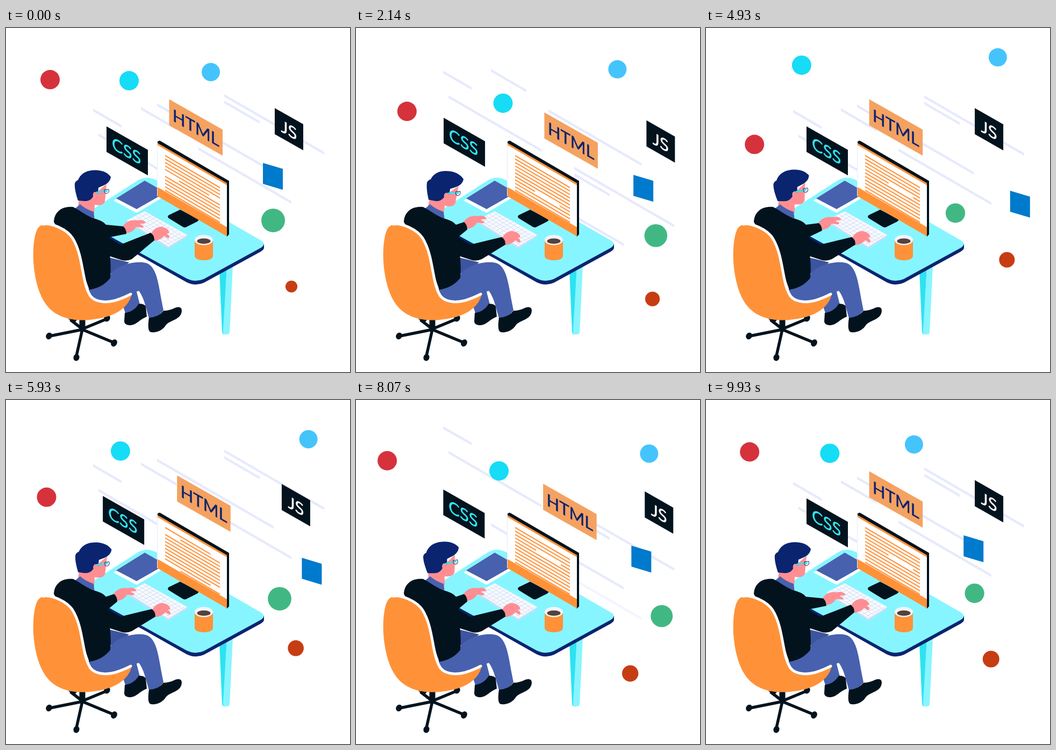
An HTML page for the animation above (10000 ms loop, 640 px wide and 640 px high).

```html
<!DOCTYPE html>
<html lang="en">
<head>
<meta charset="utf-8">
<title>Coding at the desk</title>
<style>
html, body { margin: 0; width: 100%; height: 100%; overflow: hidden; background: #fff; }
svg { display: block; width: 100vw; height: 100vh; }
text { font: 31px Lato, "Open Sans", sans-serif; stroke: currentColor; stroke-width: .5px; fill: currentColor; }
</style>
</head>
<body>
<svg viewBox="0 0 640 640">
  <defs>
    <clipPath id="keysClip"><path d="M227 357L258 341.500L335 385L302 405Z"/></clipPath>
  </defs>
  <g id="streaks" fill="#e6eafd"></g>

  <g id="css" color="#33e6f5"><path d="M0 0H77V47.500H0Z" fill="#03131d"/><text x="10" y="35.500">CSS</text></g>
  <g id="html" color="#0a2470"><path d="M0 0H99.500V48.500H0Z" fill="#f4a261"/><text x="6.500" y="36">HTML</text></g>
  <g id="js" color="#fff"><path d="M0 0H53V48.500H0Z" fill="#03131d"/><text x="11.500" y="37">JS</text></g>

  <!-- desk -->
  <path d="M397 452L411 444L404.500 570Q402 569 402 565Z" fill="#2de3f1"/>
  <path d="M411 444L422 442L416 567Q415 571 403.500 570Z" fill="#87f5ff"/>
  <path d="M480 402V409Q480 412 474 416L368 474Q352 481 336 473L140 362V350Z" fill="#0a2470"/>
  <path d="M140 351L246 283Q262 274 279 283L474 395Q485 402 474 409L368 467Q352 474 336 466L140 358Z" fill="#87f5ff"/>

  <!-- book -->
  <path d="M200 321L257 285L290 300V316L243 344Z" fill="#fff"/>
  <path d="M205 317L258 284L292 303V309L243 337Z" fill="#4761ae"/>

  <!-- monitor -->
  <path d="M303 348L324 338L357 355Q360 357 356 360L336 370Q333 372 329 370L303 354Q299 351 303 348Z" fill="#03131d"/>
  <path d="M282 212L286 210L415 285V384L411 388Z" fill="#03131d"/>
  <path d="M282 212.500L411 287.500V387.500L282 313Z" fill="#ff9239"/>
  <path d="M282 218L411 292.500V370.500L282 296Z" fill="#fff"/>
  <path d="M281.500 213V313" stroke="#e6eafd"/>
  <path d="M282 211L286 209.500L415 284.500L411 288.500L282 214Z" fill="#03131d"/>
  <g id="code" transform="matrix(1 .585 0 1 296 235.300)" stroke="#ff9239" stroke-width="2.400"></g>

  <!-- keyboard -->
  <path d="M225 358L258 341L337 385V388L302 410L225 361Z" fill="#d3dcf2"/>
  <path d="M225 357.500L258 341L337 385L302 406.500Z" fill="#f7faff"/>
  <g id="keys" clip-path="url(#keysClip)" stroke="#cfdaf0" stroke-width=".9"></g>

  <!-- mug -->
  <path d="M351 394V424C351 435 385 435 385 424V394Z" fill="#ff9239"/>
  <ellipse cx="368" cy="394.500" rx="17" ry="9.500" fill="#f4f4fa"/>
  <ellipse cx="368" cy="396.500" rx="12.500" ry="5" fill="#54423c"/>

  <!-- legs -->
  <path d="M213 503L242 487L249 514Q240 530 222 530Z" fill="#4761ae"/>
  <path d="M188 426L229 436L212 452L190 458Z" fill="#3d559f"/>
  <path d="M221 530Q238 528 247 513Q258 513 260 518L262 537C247 543 244 552 232 553Q220 553 220 545Z" fill="#03131d"/>
  <path d="M150 488L194 459C208 438 246 433 260 437C283 443 284 485 293 525Q283 539 266 540C260 519 256 500 247 489L180 513L158 510Z" fill="#4761ae"/>
  <path d="M266 539Q284 538 293 526Q304 526 316 520Q327 517 327 526C326 543 306 543 298 552C291 563 281 567 270 566Q262 565 266 539Z" fill="#03131d"/>

  <!-- chair base -->
  <g stroke="#03131d" fill="none">
    <path d="M142 540V562" stroke-width="11"/>
    <path d="M142 560L120 543M142 560L188 541M142 561L82 573M142 561L200 585M142 561L131 610" stroke-width="5.500"/>
  </g>
  <g fill="#03131d">
    <ellipse cx="188" cy="540" rx="5.500" ry="6.500" transform="rotate(30 188 540)"/>
    <ellipse cx="80" cy="573" rx="5.500" ry="6.500" transform="rotate(30 80 573)"/>
    <ellipse cx="131" cy="613" rx="5.500" ry="6.500" transform="rotate(20 131 613)"/>
    <ellipse cx="201" cy="586" rx="5.500" ry="7" transform="rotate(30 201 586)"/>
    <path d="M116 541L126 550L132 543Z"/>
  </g>

  <!-- far arm -->
  <path id="farHand" fill="#ff8e93" d="M200 361C207 351 217 348 226 350C234 348 240 350 243 354C240 357 235 355 232 357C237 359 241 361 238 363C231 364 229 361 224 363C222 369 214 373 205 374Z"/>
  <path id="farSleeve" fill="#03131d"/>

  <!-- head -->
  <g id="head">
    <path d="M136 318L164 310L187 290L184 323Q180 332 165 329L164 346L134 332Z" fill="#ff8e93"/>
    <path d="M134 283C140 268 154 264 168 264.500C181 265 190 270 195 277C194 286 187 291 179 294L172 297L171 308L165 305Q161 307 162 314Q156 323 146 322L134 321C131 312 127 298 128 289Q130 284 134 283Z" fill="#0a2470"/>
    <ellipse cx="166.500" cy="311" rx="4.500" ry="6" fill="#ff8e93"/>
    <path d="M168 306L189 303" stroke="#2de3f1" stroke-width="3"/>
    <path d="M183 301L191 300Q193 307 187 308Q182 308 183 301Z" fill="none" stroke="#22305d"/>
  </g>
  <path d="M127 337L138 328Q148 337 163 342L165 358Z" fill="#4761ae"/>

  <!-- torso and near arm -->
  <path d="M89 361C90 341 105 331 125 333C140 341 151 350 165 355C180 358 187 380 190 402C194 425 196 440 194 465Q180 483 155 487L138 440Z" fill="#03131d"/>
  <path id="nearHand" fill="#ff8e93" d="M272 392C276 382 286 378 293 379C302 381 307 387 305 391L301 391C306 395 308 399 304 400C300 400 299 396 296 396C293 400 286 404 278 405Z"/>
  <path id="nearSleeve" fill="#03131d"/>

  <!-- chair -->
  <path d="M66 367C79 363 111 374 122 391C143 425 142 470 158 501C166 514 187 514 204 508L234 495C230 515 210 535 170 541C130 548 95 541 75 515C55 488 49 440 51 410C53 385 57 370 66 367Z" fill="#ff9239"/>
  <path d="M69 365C84 362 113 374 124 391C144 424 141 468 154 493C161 510 183 512 203 507Q219 502 232 495" fill="none" stroke="#fff" stroke-width="5" stroke-linecap="round"/>

  <g id="badges"></g>
</svg>
<script>
const LOOP = 10000, BEAT = 5000;
const $ = id => document.getElementById(id);

function add(parent, tag, attrs = {}) {
  const el = document.createElementNS("http://www.w3.org/2000/svg", tag);
  for (const k in attrs) el.setAttribute(k, attrs[k]);
  parent.appendChild(el);
  return el;
}

const place = (el, value) => el.setAttribute("transform", value);
const clamp = v => Math.max(0, Math.min(1, v));
const swing = u => (1 - Math.cos(Math.PI * u)) / 2;
const mix = (a, b, u) => a + (b - a) * u;
const mod = (a, n) => (a % n + n) % n;

// Streaks: each lives a little over one beat, so two copies can overlap.
const LIFE = 5200, FADE = 350;
const streaks = [
  { x: 162, y: 150, w: 53, born: 3400 },
  { x: 172, y: 196, w: 173, born: 4000 },
  { x: 251, y: 147, w: 66, born: 2600 },
  { x: 281, y: 140, w: 217, born: 1200 },
  { x: 358, y: 222, w: 173, born: 2900 },
  { x: 406, y: 123, w: 186, born: 1200 },
  { x: 406, y: 135, w: 66, born: 1200 }
];
for (const s of streaks) {
  const drop = s.w * .578;
  const d = `M${s.x} ${s.y}l${s.w} ${drop}v5l${-s.w} ${-drop}z`;
  s.copies = [0, BEAT].map(shift => ({ shift, el: add($("streaks"), "path", { d }) }));
}

function drawStreaks(t) {
  for (const { born, copies } of streaks) {
    for (const { shift, el } of copies) {
      const age = t % BEAT + shift, left = BEAT - age;
      const dy = .033 * left + 5e-6 * Math.max(0, left) ** 2;
      el.setAttribute("opacity", clamp(Math.min(age - born, born + LIFE - age) / FADE));
      place(el, `translate(0 ${dy})`);
    }
  }
}

// Plates slide out until `peak` and are home again at `end`.
const plates = [
  { id: "css", x: 187, y: 183, dx: -27.5, dy: -18.5, peak: 2800, end: 4100 },
  { id: "html", x: 303.5, y: 132.5, dx: 50, dy: 26, peak: 2550, end: BEAT },
  { id: "js", x: 500, y: 149, dx: 42.5, dy: 24, peak: 2500, end: BEAT }
];

function drawPlates(t) {
  const p = t % BEAT;
  for (const { id, x, y, dx, dy, peak, end } of plates) {
    const u = swing(clamp(p < peak ? p / peak : (end - p) / (end - peak)));
    place($(id), `matrix(1 .568 0 1 ${x + dx * u} ${y + dy * u})`);
  }
}

// Badges drift between four stops, one per quarter of the loop.
const badges = [
  { fill: "#d6323c", r: 18, stops: [[82, 96], [97, 165], [90, 218], [51, 118]] },
  { fill: "#16dcf5", r: 18, stops: [[229, 98], [281, 147], [175, 67], [277, 142]] },
  { fill: "#45c4fb", r: 17, stops: [[381, 82], [504, 76], [544, 54], [594, 105]] },
  { fill: "#41b883", r: 22, stops: [[497, 358], [568, 391], [461, 343], [590, 415]],
    scale: t => 1 - .18 * (t % BEAT / BEAT) ** 2 },
  { fill: "#c63d14", r: 15.5, stops: [[531, 481], [555, 508], [560, 429], [504, 517]],
    scale: t => .7 + .3 * Math.cbrt(t / LOOP) },
  { fill: "#007acc", tile: true, stops: [[496.5, 276], [541, 302], [585.5, 328.5], [541, 302]] }
];
for (const b of badges) {
  b.el = b.tile
    ? add($("badges"), "path", { d: "M-18.5 -19.5h37v39h-37z", fill: b.fill })
    : add($("badges"), "circle", { r: b.r, fill: b.fill });
}

function drawBadges(t) {
  const q = t / LOOP * 4, i = Math.floor(q);
  for (const { el, stops, scale, tile } of badges) {
    const a = stops[i], b = stops[(i + 1) % 4], k = scale ? scale(t) : 1;
    const [x, y] = a.map((v, n) => mix(v, b[n], q - i));
    place(el, `matrix(${k} ${tile ? .3 : 0} 0 ${k} ${x} ${y})`);
  }
}

// Code on the monitor: a gap runs along the rows like a cursor, one every CYCLE rows.
const ROWS = 11, CYCLE = 9, GAP = .45, WIDTH = 102, PASSES = 6;
const rows = Array.from({ length: ROWS }, () => add($("code"), "path"));

function drawCode(t) {
  const head = 4.8 + t / LOOP * PASSES * CYCLE;
  rows.forEach((el, r) => {
    const from = mod(head - r, CYCLE), to = mod(from + GAP, CYCLE);
    const y = 2 + r * 6.45;
    let d = "";
    if (to >= 1 || from >= 1) d = `M${to < 1 ? to * WIDTH : 0} ${y}H${Math.min(1, from) * WIDTH}`;
    else d = `M0 ${y}H${from * WIDTH}M${to * WIDTH} ${y}H${WIDTH}`;
    el.setAttribute("d", d);
  });
}

for (let i = 1; i < 12; i++) add($("keys"), "path", { d: `M${225 + i * 6.6} ${357.5 + i * 4.15}l34 -17.5` });
for (let i = 0; i < 5; i++) add($("keys"), "path", { d: `M${228 + i * 6.5} ${356 - i * 3.3}l77 47` });

// head tilt in degrees
const nod = [[0, 0], [2140, 5.5], [3790, -3], [4930, -3.5], [6860, 6], [8070, -4], [LOOP, 0]];

function tilt(t) {
  const i = nod.findIndex(k => k[0] > t), [t0, a] = nod[i - 1], [t1, b] = nod[i];
  return mix(a, b, swing((t - t0) / (t1 - t0)));
}

// a short reach around the moment `at`
function reach(t, at) {
  const d = Math.abs(mod(t - at + BEAT, LOOP) - BEAT);
  return swing(clamp(1 - d / 900));
}

function drawPerson(t) {
  place($("head"), `rotate(${tilt(t)} 150 332)`);
  const far = reach(t, 0), half = reach(t, BEAT);
  const fx = 17 * far + 9 * half, fy = 8 * far + 2 * half;
  const nx = -2 * far, ny = -1 - 8 * far;
  place($("farHand"), `translate(${fx} ${fy})`);
  place($("nearHand"), `translate(${nx} ${ny})`);
  $("farSleeve").setAttribute("d",
    `M162 354Q180 358 186 366L${201 + fx} ${361 + fy}Q${207 + fx} ${366 + fy} ${207 + fx} ${375 + fy}L189 390L176 395Z`);
  $("nearSleeve").setAttribute("d",
    `M150 372L188 388L213 403L${271 + nx} ${390 + ny}Q${278 + nx} ${394 + ny} ${278 + nx} ${404 + ny}L234 430Q225 434 216 432L188 423L158 408Z`);
}

function draw(t) {
  drawStreaks(t);
  drawPlates(t);
  drawBadges(t);
  drawCode(t);
  drawPerson(t);
}

const start = performance.now();
function frame() {
  draw((performance.now() - start) % LOOP);
  requestAnimationFrame(frame);
}
draw(0);
requestAnimationFrame(frame);
</script>
</body>
</html>
```
